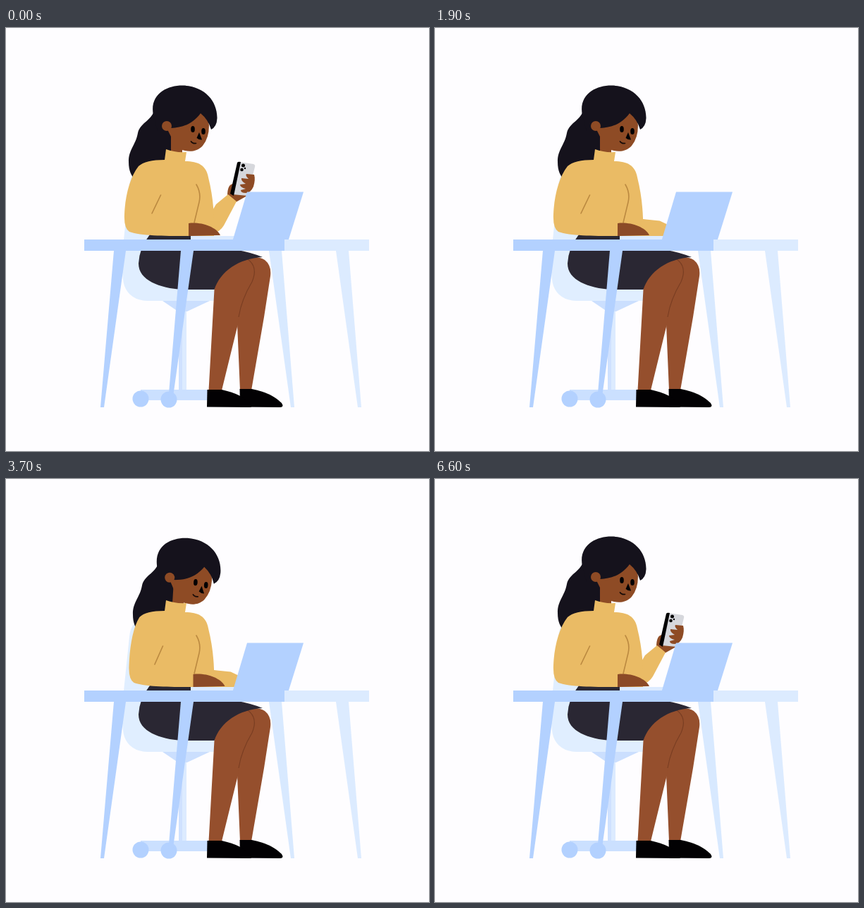
An HTML page that plays this animation: 600 px wide and 600 px high, repeating every 6700 ms.

```html
<!DOCTYPE html>
<html lang="en">
<head>
<meta charset="utf-8">
<title>Working at a desk</title>
<style>
  html, body { margin: 0; width: 100%; height: 100%; overflow: hidden; background: #fefdff; }
  svg { display: block; width: 100vw; height: 100vh; }
  .light { fill: #dcebff; }
  .blue { fill: #b3d1ff; }
  .hair { fill: #15121c; }
  .face { fill: #8e4b25; }
  .skin { fill: #954f2d; }
  .knit { fill: #eabb65; }
  .ink { fill: #020103; }
  .fold { fill: none; stroke: #bb8940; stroke-width: 1.6; stroke-linecap: round; }
</style>
</head>
<body>
<svg viewBox="0 0 600 600">
  <!-- chair -->
  <path fill="#e0eeff" d="M182 205Q176 211 175 224L166 310Q163 350 168 366Q176 386 200 387H297V300H205Z"/>
  <path fill="#cbdffe" d="M222 387H289L257 402H244Z"/>
  <path fill="#cfe1ff" d="M245 402H250V515H245Z"/>
  <path class="light" d="M250 402H256V515H250Z"/>
  <path fill="#cbe0ff" d="M191 513H290V528H191Z"/>
  <circle class="blue" cx="191" cy="526" r="11.5"/>
  <circle class="blue" cx="231" cy="527" r="11.5"/>

  <!-- far table legs -->
  <path fill="#d8e9ff" d="M373 316H391L409 538H404Z"/>
  <path class="light" d="M468 316H486L504 538H499Z"/>

  <!-- legs and skirt -->
  <path id="farLeg" class="skin"/>
  <path id="farShoe" class="ink" d="M331.500 512H348.500Q376 517 391 532Q395 538 388 538L332 537.500Z"/>
  <path class="skin" d="M295.500 371C298 345 325 324 352 324Q360 345 344 371Q332 390 329 420L306 514H287.500Z"/>
  <path fill="none" stroke="#783d22" stroke-width="1.1" d="M343 328Q358 339 349 360Q334 385 330 410"/>
  <path class="ink" d="M285.500 513H306Q334 519 347 533Q350 538 346 538L285 537.500Z"/>
  <path fill="#2a2733" d="M204 293H265V312Q325 309 364 325C330 327 304 345 295.500 371H250C218 369 188 358 188 334Q189 312 204 293Z"/>

  <!-- far arm with phone, turning about the elbow -->
  <path id="tail" class="hair" d="M210 118C205 132 190 135 187 149C184 166 173.500 173 174 190C174 203 178 210 183 215C195 196 215 190 230 188L240 172L236 122Z"/>
  <g id="forearm">
    <path class="face" d="M314 238Q314 222 322 221L335 218L342 238L326 247Z"/>
    <path fill="#d6d7dc" d="M331 190L351 193Q354 194 353 197L343 238L321 236Z"/>
    <path class="ink" d="M328 191Q329 189 333 190L323 238L318 235Z"/>
    <g class="ink">
      <circle cx="336.5" cy="195" r="2.5"/>
      <circle cx="334.5" cy="201" r="2.3"/>
      <circle cx="339" cy="199" r="1.2"/>
    </g>
    <path class="face" d="M352 208Q354 215 351 225Q347 234 340 234Q333 234 333 230L340 228Q332 226 332 222L340 221Q333 217 334 213L344 214Q339 209 341 207Z"/>
    <path class="knit" d="M288 267L298 250L315 236L327 246L309 280Q303 290 293 291L276 286Z"/>
  </g>

  <!-- head -->
  <g id="neckHead">
    <path class="face" d="M234 138L262 116H284L288 138Q288 156 279 167C271 176 259 176 250 173V180H234Z"/>
    <path class="hair" d="M209 124C203 94 228 81.500 250 81.500C281 82 300 103 299.500 128Q299 140 291 144Q287 130 276 121C264 137 250 141 234 142L232 150H216Z"/>
    <circle class="face" cx="228" cy="139" r="7"/>
    <path class="face" d="M228 142H236V158Z"/>
    <ellipse class="ink" cx="265" cy="143.500" rx="2.800" ry="4.600"/>
    <ellipse class="ink" cx="280" cy="146.500" rx="2.800" ry="4.600"/>
    <path class="ink" d="M274 148L278 158.500Q274 159 270.500 156Z"/>
    <path fill="none" stroke="#160b08" stroke-width="1.700" stroke-linecap="round" d="M262.500 161Q265 164.500 269.500 163.500"/>
  </g>

  <!-- torso and near arm -->
  <path id="torso" class="knit"/>
  <path id="elbowFold" class="fold"/>
  <path class="fold" d="M270 222Q277 234 274 247L267 276"/>

  <!-- laptop, hand and table -->
  <path class="light" d="M262 295H326V301H262Z"/>
  <path id="hand" fill="#8b4a27" d="M259 277C276 275 297 281 304 294L259 295Z"/>
  <path class="blue" d="M342 232.500H422L400 303H321Z"/>
  <path class="light" d="M394 300H515V316H394Z"/>
  <path class="blue" d="M111 300H395V316H111Z"/>
  <path class="blue" d="M153 316H170L139 538H134Z"/>
  <path class="blue" d="M248 316H266L236 530H230Z"/>
</svg>
<script>
  const LOOP = 6700, STEP = 100;
  const parts = Object.fromEntries(
    [...document.querySelectorAll("[id]")].map(el => [el.id, el]));
  const set = (id, name, value) => parts[id].setAttribute(name, value);

  const ease = p => p < 0.5 ? 4 * p ** 3 : 1 - 4 * (1 - p) ** 3;
  const ramp = (t, from, to) => ease(Math.min(1, Math.max(0, (t - from) / (to - from))));

  function draw(t) {
    const lowered = ramp(t, 900, 1800) - ramp(t, 5900, 6600);
    const nod = ramp(t, 2600, 3300) - ramp(t, 6250, 6600);
    const foot = 10.5 * (ramp(t, 1900, 2500) - ramp(t, 2750, 3350));
    const reach = 6.5 * (ramp(t, 2900, 3500) - ramp(t, 3800, 5500));
    const sway = 1.4 * (ramp(t, 3400, 5300) - ramp(t, 6250, 6600));

    set("forearm", "transform", `rotate(${65 * lowered} 290 278)`);
    set("neckHead", "transform",
      `translate(${2 * nod} ${2 * nod}) rotate(${3.5 * nod} 248 175)`);
    set("tail", "transform",
      `translate(${6 * nod} ${2 * nod}) rotate(${sway} 213 120)`);

    set("farShoe", "transform", `translate(${foot} 0)`);
    set("farLeg", "d", `M340 327Q356 322 367 329Q377 337 375 352L${366 + foot * 0.4} 410
      L${348 + foot} 514H${332 + foot}L${328 + foot * 0.35} 420L335 372Z`);

    const x = v => v + reach;
    set("torso", "d", `M227 172Q240 177 256 176L254 189C273 189 284 195 287 212
      Q294 240 295 270V295H${x(259)}C${x(225)} 295 ${x(192)} 295 ${x(175)} 289
      Q${x(167)} 284 ${x(168)} 264C${x(169)} 238 ${176 + reach * 0.6} 211 ${188 + reach * 0.2} 196
      Q198 187 225 187Z`);
    set("elbowFold", "d", `M${219.5 + reach * 0.45} 237L${207 + reach * 0.6} 263`);
    set("hand", "transform", `translate(${reach} 0)`);
  }

  const start = performance.now();
  function tick() {
    const t = (performance.now() - start) % LOOP;
    draw(Math.floor(t / STEP) * STEP);
    requestAnimationFrame(tick);
  }
  tick();
</script>
</body>
</html>
```
